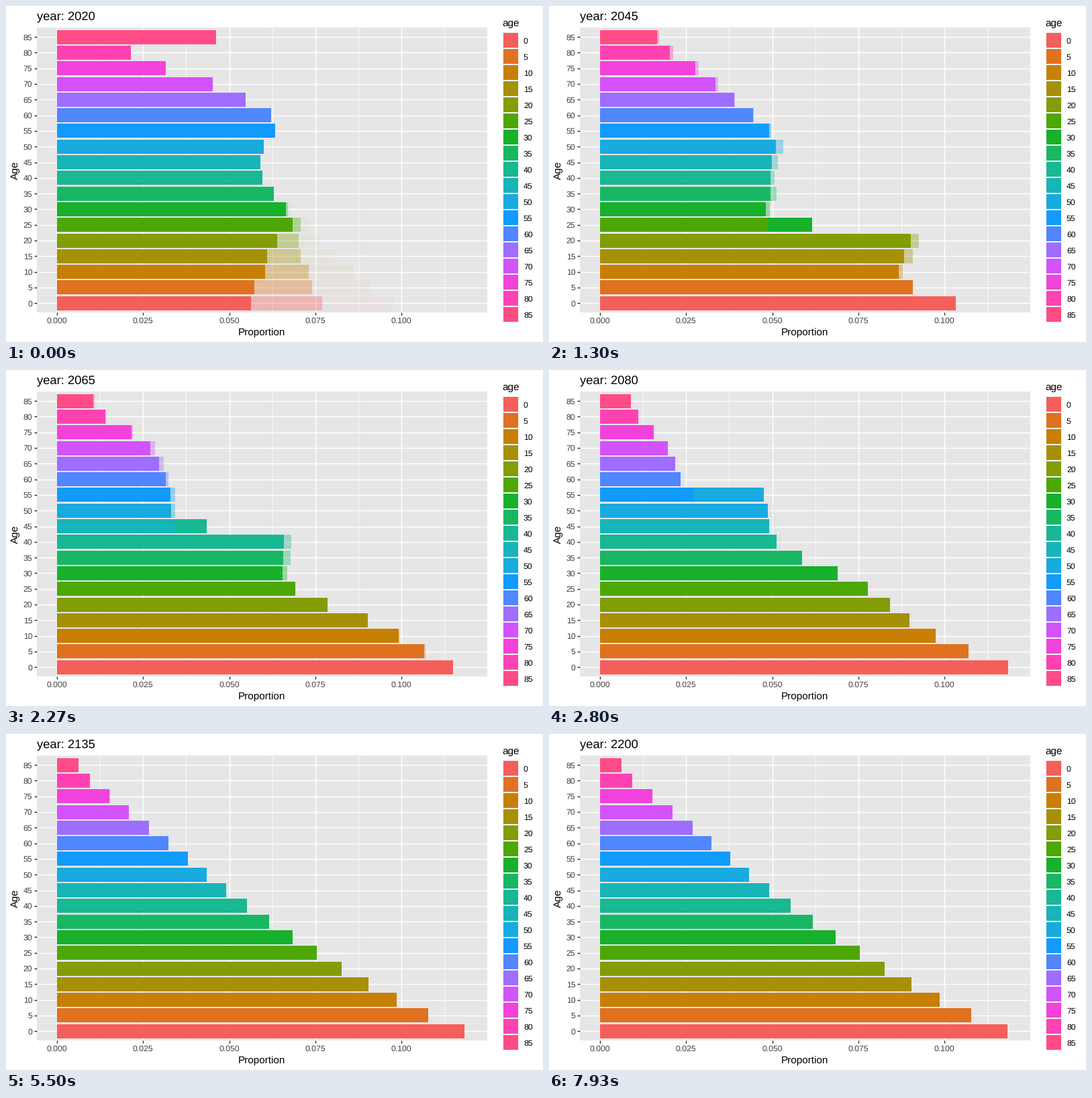
Animation of 800x500 px, one loop 8 s. Source, as a matplotlib script:

```python
import numpy as np
import matplotlib.pyplot as plt
from matplotlib.animation import FuncAnimation
from matplotlib.patches import Rectangle

W, H, DPI = 800, 500, 100
FRAMES, INTERVAL = 320, 25
MOVE = 3                      # ticks per transition, 30 ticks a second
AGES = range(0, 90, 5)
COLORS = ["#f55f5b", "#e0711e", "#c77f04", "#a69005", "#829d05", "#4da704",
          "#17b12b", "#18b763", "#18b892", "#17b4b8", "#17abdf", "#129bfb",
          "#5086ff", "#9f6dff", "#d253fc", "#f143dc", "#ff42b2", "#ff4c87"]

# Panel geometry in pixels
LEFT, RIGHT, TOP, BOTTOM = 46, 717, 32, 456
X0, X_UNIT = 76.1, 5128
Y0, Y_STEP = 442.22, 23.297
BAR_H = .9 * Y_STEP

# Text sizes in points
SMALL, MEDIUM, LARGE = 8.8, 11, 13.2

# Cohort model: starting ages, births per step and survival to each age
START = 1.522 * np.array([289, 294, 310, 313, 328, 351, 341, 323, 306,
                          303, 308, 325, 319, 281, 232, 162, 110, 237])
BIRTHS = [763, 684, 607, 563, 576, 613, 626, 618, 603, 600, 603, 608,
          610, 608, 605, 605] + [607] * 20
ALIVE = np.array([1, .911, .834, .7645, .6985, .6377, .5783, .522, .468,
                  .4155, .366, .3195, .2735, .2272, .178, .1286, .079])
SURVIVAL = ALIVE[1:] / ALIVE[:-1]


def project():
    pop, shares = START, [START / START.sum()]
    for births in BIRTHS:
        oldest = .417 * pop[16] + .375 * pop[17]
        pop = np.concatenate([[births], pop[:16] * SURVIVAL, [oldest]])
        shares.append(pop / pop.sum())
    return np.array(shares) * X_UNIT


WIDTHS = project()
LAST = len(WIDTHS) - 1
ARRIVE = [0] + [6 + 7 * j for j in range(23)] + [166 + 6 * j for j in range(13)]


def state_at(tick):
    return max(k for k, start in enumerate(ARRIVE) if start <= tick)


def mix(a, b, t):
    return a + (b - a) * t


def progress(tick, k):
    if k == LAST:
        return 0
    return max(0, tick - ARRIVE[k + 1] + MOVE) / MOVE


def widths_at(tick):
    if tick < 0:
        return mix(WIDTHS[LAST], WIDTHS[0], max(0, tick + MOVE) / MOVE)
    k = state_at(tick)
    t = progress(tick, k)
    return mix(WIDTHS[k], WIDTHS[k + 1], t) if t else WIDTHS[k]


plt.rcParams["font.family"] = "Liberation Sans"
plt.rcParams["text.hinting"] = "none"
fig = plt.figure(figsize=(W / DPI, H / DPI), dpi=DPI, facecolor="white")
ax = fig.add_axes([0, 0, 1, 1])
ax.set_xlim(0, W)
ax.set_ylim(H, 0)
ax.axis("off")


def box(x, y, w, h, color, z, alpha=None):
    patch = Rectangle((x, y), w, h, facecolor=color, edgecolor="none",
                      linewidth=0, alpha=alpha, zorder=z)
    return ax.add_patch(patch)


def line(xs, ys, color, width=1.07):
    ax.plot(xs, ys, color=color, lw=width, zorder=1, solid_capstyle="butt")


def label(x, y, text, size, color="black", **kw):
    return ax.text(x, y, text, fontsize=size, color=color, va="baseline", **kw)


def bar_y(i):
    return Y0 - Y_STEP * i


def draw_panel():
    box(LEFT, TOP, RIGHT - LEFT, BOTTOM - TOP, "#e6e6e6", 0)
    for j in range(5):
        x = X0 + j * .025 * X_UNIT
        minor = x + .0125 * X_UNIT
        line([minor] * 2, [TOP, BOTTOM], "white", .53)
        line([x] * 2, [TOP, BOTTOM], "white")
        line([x] * 2, [BOTTOM, BOTTOM + 3.8], "#333333")
        label(x, 472, f"{j * .025:.3f}", SMALL, "#404040", ha="center")
    for i, age in enumerate(AGES):
        y = bar_y(i)
        line([LEFT, RIGHT], [y, y], "white")
        line([LEFT - 3.8, LEFT], [y, y], "#333333")
        label(39.5, y + 4.3, age, SMALL, "#404040", ha="right")
    label(381.3, 490, "Proportion", MEDIUM, ha="center")
    label(18, 244.3, "Age", MEDIUM, rotation=90, ha="center",
          rotation_mode="anchor")


def draw_legend():
    label(739.5, 30, "age", MEDIUM)
    box(740, 39, 24, 432, "#f5f5f5", 0)
    for i, age in enumerate(AGES):
        y = 51.3 + 24 * i
        box(741, y - 11, 22, 22, COLORS[i], 2)
        label(771, y + 4.5, age, SMALL)


def bar_set(z, alpha=None):
    return [box(X0, bar_y(i) - BAR_H / 2, 0, BAR_H, c, z, alpha)
            for i, c in enumerate(COLORS)]


def resize(bars, widths):
    for bar, w in zip(bars, widths):
        bar.set_width(w)


draw_panel()
draw_legend()
faint = bar_set(3, .04)
wake = bar_set(4, .33)
bars = bar_set(5)
front = box(X0, 0, 0, BAR_H, "white", 6)
title = label(46, 21, "", LARGE)


def update(frame):
    tick = (3 * frame + 1) // 4
    k = state_at(tick)
    t = progress(tick, k)
    now = widths_at(tick)
    resize(bars, now)
    # The trail stays frozen while a state rests
    seen = tick if t else min(tick, ARRIVE[k] + 1)
    resize(wake, widths_at(seen - 1))
    resize(faint, widths_at(seen - 2))

    # Freshly grown part of the leading large cohort
    goal = k + 1 if t else k
    i = goal - 1
    front.set_visible(2 <= i <= 11)
    if front.get_visible():
        before = WIDTHS[goal - 1][i]
        front.set_xy((X0 + before, bar_y(i) - BAR_H / 2))
        front.set_width(max(0, now[i] - before))
        front.set_facecolor(COLORS[i + 1 if i < 6 else i - 1])

    title.set_text(f"year: {2020 + 5 * k}")
    return [*faint, *wake, *bars, front, title]


anim = FuncAnimation(fig, update, frames=FRAMES, interval=INTERVAL,
                     repeat=True, repeat_delay=0, blit=False)
plt.show()
```
